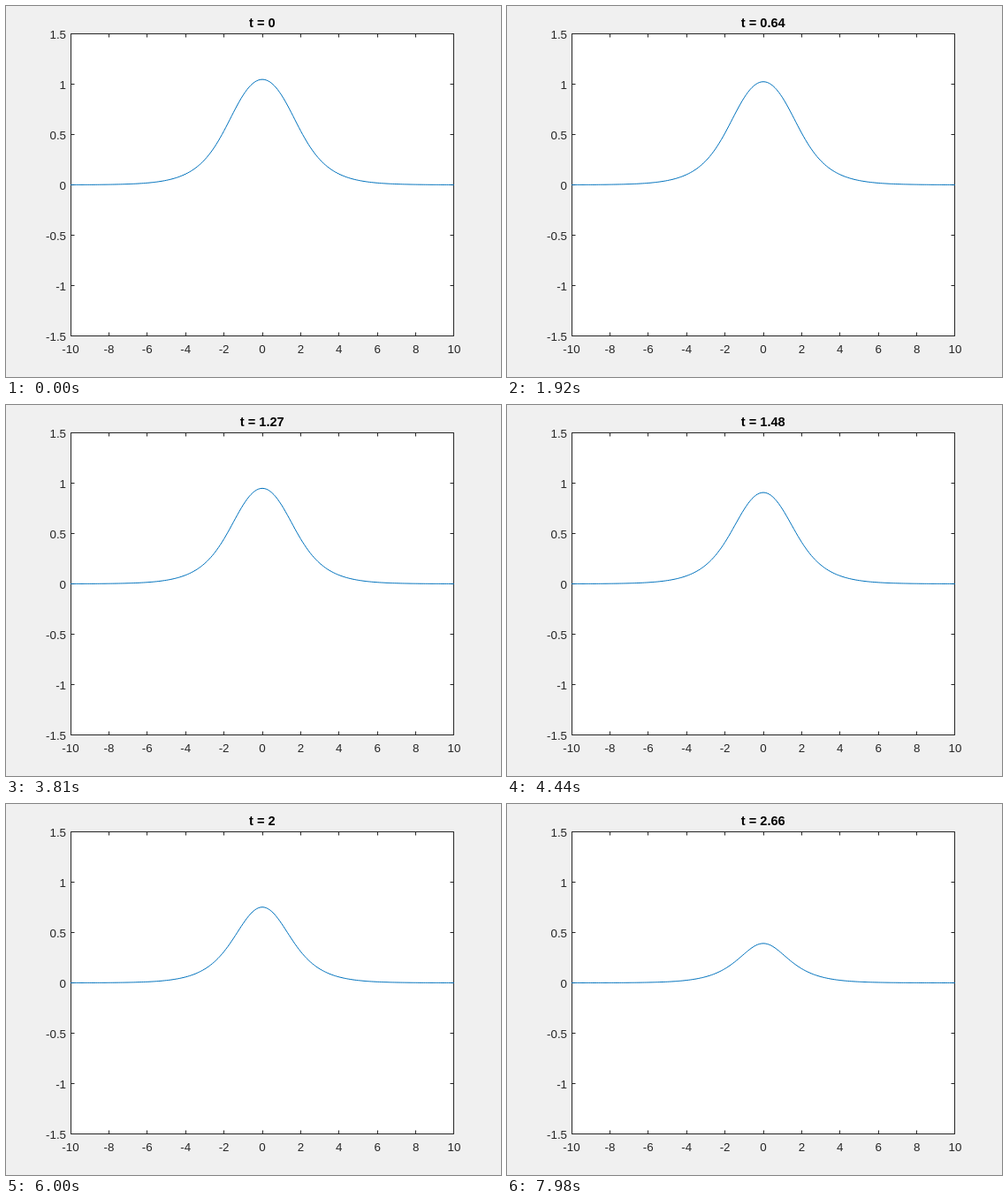
An HTML page for the animation above (8000 ms loop, 560 by 420 pixels).

```html
<!DOCTYPE html>
<html lang="en">
<head>
<meta charset="utf-8">
<title>Breather</title>
<style>
  html, body { margin: 0; width: 100%; height: 100%; overflow: hidden; background: #f0f0f0; }
  svg { display: block; }
  text { font: 13.33px "Liberation Sans", Arial, sans-serif; fill: #262626; text-anchor: middle; }
  .y { text-anchor: end; }
  #title { font-size: 14.6px; font-weight: bold; fill: #000; }
  path { fill: none; stroke: #262626; }
  #curve { stroke: #0072bd; stroke-linejoin: round; }
</style>
</head>
<body>
<svg width="560" height="420" viewBox="0 0 560 420">
  <rect x="73" y="31" width="434" height="343" fill="#fff"/>
  <path id="axes"/>
  <g id="labels"></g>
  <text id="title" x="289.8" y="24"></text>
  <path id="curve"/>
</svg>
<script>
const LEFT = 73, RIGHT = 507, TOP = 31.5, BOTTOM = 373.5, TICK = 4;
const LOOP = 8000, STEP = 30;
const get = id => document.getElementById(id);
const toX = x => LEFT + (x + 10) / 20 * (RIGHT - LEFT);
const toY = y => BOTTOM - (y + 1.5) / 3 * (BOTTOM - TOP);
// Centre of the pixel column, kept inside the right edge
const column = x => Math.min(Math.floor(toX(x)), RIGHT - 1) + 0.5;

function drawAxes() {
  const left = column(-10), right = column(10);
  let path = `M${left} ${TOP}H${right}V${BOTTOM}H${left}Z`;
  let labels = '';
  for (let x = -10; x <= 10; x += 2) {
    path += `M${column(x)} ${BOTTOM}v${-TICK}M${column(x)} ${TOP}v${TICK}`;
    labels += `<text x="${toX(x)}" y="393">${x}</text>`;
  }
  for (let y = -1.5; y <= 1.5; y += 0.5) {
    const py = toY(y);
    path += `M${left} ${py}h${TICK}M${right} ${py}h${-TICK}`;
    labels += `<text class="y" x="68" y="${py + 5.5}">${y}</text>`;
  }
  get('axes').setAttribute('d', path);
  get('labels').innerHTML = labels;
}

// Standing breather with frequency 1/2
function breather(x, t) {
  return Math.atan(Math.sqrt(3) * Math.cos(t / 2) / Math.cosh(Math.sqrt(3) / 2 * x));
}

function draw(now) {
  const t = Math.floor(now % LOOP / STEP) / 100;
  const points = [];
  for (let i = 0; i <= 200; i++) {
    const x = i / 10 - 10;
    points.push(`${toX(x).toFixed(2)} ${toY(breather(x, t)).toFixed(2)}`);
  }
  get('curve').setAttribute('d', 'M' + points.join('L'));
  get('title').textContent = `t = ${t}`;
  requestAnimationFrame(draw);
}

drawAxes();
draw(0);
</script>
</body>
</html>
```
